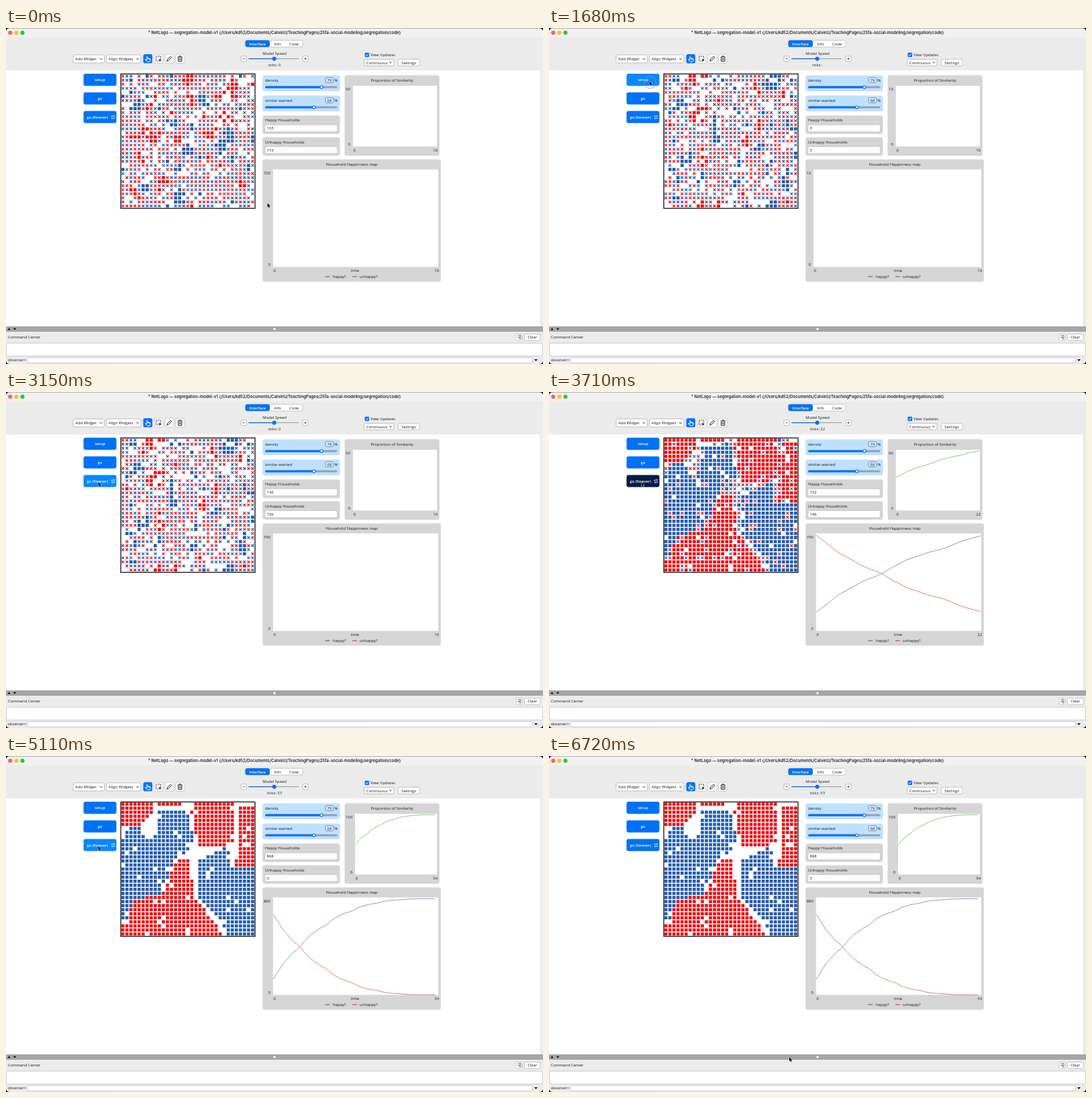
Animation of 800 by 500 pixels, one loop 6930 ms. Source, as an HTML page with a canvas:

```html
<!DOCTYPE html>
<html lang="en">
<head>
<meta charset="utf-8">
<title>Segregation model</title>
<style>
html, body { margin: 0; width: 100%; height: 100%; overflow: hidden; background: #000; }
canvas { display: block; width: 800px; height: 500px; }
</style>
</head>
<body>
<canvas id="stage" width="800" height="500"></canvas>
<script>
const ctx = document.getElementById('stage').getContext('2d');
const LOOP = 6930, STEP = 70;
const BLUE = '#0072f5', HOVER = '#0a87ff', DARK = '#051c45', PANEL = '#d5d5d5';
const AGENT = { red: '#eb1014', blue: '#235bab' };
const FAMILY = '"Open Sans", "Noto Sans", sans-serif';
const REGULAR = '5.85px ' + FAMILY, BOLD = '600 5.7px ' + FAMILY;
const N = 33, PITCH = 6.04, LEFT = 174.1, TOP = 71.6;

// ---------- drawing helpers ----------
function box(x, y, w, h, fill, r = 0, stroke, lw = 0.7) {
  ctx.beginPath();
  ctx.roundRect(x, y, w, h, r);
  if (fill) { ctx.fillStyle = fill; ctx.fill(); }
  if (stroke) { ctx.strokeStyle = stroke; ctx.lineWidth = lw; ctx.stroke(); }
}

function dot(x, y, r, fill, stroke, lw = 1) {
  box(x - r, y - r, 2 * r, 2 * r, fill, r, stroke, lw);
}

function shape(d, x, y, fill, stroke, lw = 0.8) {
  const p = new Path2D(d);
  ctx.save();
  ctx.translate(x, y);
  if (stroke) { ctx.strokeStyle = stroke; ctx.lineWidth = lw; ctx.stroke(p); }
  if (fill) { ctx.fillStyle = fill; ctx.fill(p); }
  ctx.restore();
}

// y is the middle of the capitals
function text(s, x, y, align = 'left', color = '#1c1c1c', font = REGULAR) {
  ctx.font = font;
  ctx.textAlign = align;
  ctx.fillStyle = color;
  ctx.fillText(s, x, y + 2.1);
}

function line(x0, y0, x1, y1, color, lw = 0.8) {
  shape(`M${x0} ${y0}L${x1} ${y1}`, 0, 0, null, color, lw);
}

function random(i, seed) {
  const v = Math.sin(i * 12.9898 + seed * 78.233) * 43758.5453;
  return v - Math.floor(v);
}

const clamp = v => Math.min(1, Math.max(0, v));
const roundUp = (v, unit) => Math.ceil(v / unit) * unit;

// ---------- model ----------
const DENSITY = 0.79, WANTED = 0.68, LAST = 53, HOUSEHOLDS = 868, CONTENT = 142;

const cellX = i => LEFT + (i % N) * PITCH;
const cellY = i => TOP + Math.floor(i / N) * PITCH;
const wrap = v => (v + N) % N;

function scatter(seed) {
  return Array.from({ length: N * N }, (_, i) =>
    random(i, seed) > DENSITY ? null : random(i, seed + 1) < 0.5 ? 'red' : 'blue');
}

function isContent(world, i) {
  let alike = 0, all = 0;
  for (let dy = -1; dy <= 1; dy++)
    for (let dx = -1; dx <= 1; dx++) {
      const other = world[wrap(Math.floor(i / N) + dy) * N + wrap(i % N + dx)];
      if (!other || (!dx && !dy)) continue;
      all++;
      if (other === world[i]) alike++;
    }
  return alike >= WANTED * all;
}

// outlines of the neighbourhoods that form in the end
const redLand = new Path2D(
  'M171 69H219V86L200 104H171Z M225 69H262V75H225Z' +
  'M280 69H342L337 92L340 122L332 134H288L274 86Z' +
  'M346 75H371V163H342L348 128Z' +
  'M256 153H272L281 208L324 268H171V250H180L190 214L232 206Z');
const blueLand = new Path2D(
  'M226 83L270 82L280 122L272 140L250 155L232 204L200 212L180 244H171V128L184 106H200L207 122L226 118Z' +
  'M283 158L324 136L336 140V164H371V268H328L322 244L286 212Z');

const before = scatter(3), start = scatter(11);
const settled = start.map((_, i) => {
  if (random(i, 21) < 0.03) return null;
  if (ctx.isPointInPath(redLand, cellX(i), cellY(i))) return 'red';
  return ctx.isPointInPath(blueLand, cellX(i), cellY(i)) ? 'blue' : null;
});

// share of the way from the random start to full contentment
function progress(tick) {
  const rest = 1 - tick / LAST;
  const bump = (0.025 + 0.02 * random(tick, 5)) * Math.abs(Math.sin(Math.PI * tick / 8.5));
  return 1 - Math.pow(rest, 2.83) + bump * Math.pow(rest, 1.5);
}
const happyAt = tick => Math.round(CONTENT + (HOUSEHOLDS - CONTENT) * progress(tick));
const unhappyAt = tick => HOUSEHOLDS - happyAt(tick);
const similarAt = tick => 49 + 49.4 * progress(tick);

// open ground clears last
function hasSettled(i, done) {
  const r = random(i, 22);
  return done >= (settled[i] ? 0.94 * r : 0.8 + 0.2 * r);
}

function stateAt(t) {
  if (t < 1610) return { world: before, tick: 0, happy: 153, unhappy: 719, done: 0 };
  if (t < 1750) return { world: start, tick: null, happy: 0, unhappy: 0, done: 0 };
  const tick = Math.round(LAST * (1 - Math.pow(1 - clamp((t - 3500) / 700), 1.5)));
  const done = progress(tick);
  const world = start.map((kind, i) => tick && hasSettled(i, done) ? settled[i] : kind);
  return { world, tick, happy: happyAt(tick), unhappy: unhappyAt(tick), done };
}

// ---------- pointer ----------
const moves = [
  { from: 70, to: 1400, a: [389.5, 260.5], b: [149.5, 79] },
  { from: 2100, to: 3150, a: [149.5, 79], b: [137.5, 134] },
  { from: 5110, to: 6720, a: [137.5, 134], b: [358, 448] }
];

function pointerAt(t) {
  const { from, to, a, b } = moves.findLast(m => t >= m.from) ?? moves[0];
  const u = clamp((t - from) / (to - from));
  const e = u * u * u * (10 - 15 * u + 6 * u * u);
  return { x: a[0] + (b[0] - a[0]) * e, y: a[1] + (b[1] - a[1]) * e };
}

// ---------- parts ----------
function drawWindow() {
  ctx.fillStyle = '#000';
  ctx.fillRect(0, 0, 800, 500);
  box(0, 0.6, 800, 499.4, '#ebebeb', 5);
  box(0, 0.6, 800, 13.4, '#f1f1f1', [5, 5, 0, 0]);
  ['#ff5f57', '#febc2e', '#28c840'].forEach((c, i) => dot(6.3 + 9.1 * i, 7, 3.1, c));
  text('* NetLogo — segregation-model-v1 {/Users/kd52/Documents/CalvinU/TeachingPages/25fa-social-modeling/segregation/code}',
    400, 7, 'center', '#222', '600 6.1px Inter, sans-serif');
  box(0, 63, 795.5, 381, '#fff');
}

function drawDropdown(label, x, y, w, h) {
  box(x, y, w, h, '#fff', 2, '#a8a8a8');
  text(label, x + 3.3, y + h / 2);
  shape('M-1.8 -1L0 1L1.8 -1', x + w - 5, y + h / 2, null, '#333', 0.9);
}

function drawTools() {
  drawDropdown('Add Widget', 100, 40, 46.5, 12);
  drawDropdown('Align Widgets', 149.5, 40, 51.5, 12);
  for (let i = 0; i < 4; i++)
    box(204.5 + 16 * i, 39, 13.5, 13.5, i ? '#f7f7f7' : BLUE, 2.5, i ? '#c4c4c4' : null);
  shape('M-1 1V-4.2M-1 -1.2H.8V1M.8 -.6H2.6V1M2.6 0H4V2.2Q4 4.5 2 4.5H.2Q-1 4.5 -3.5 .8L-1 1.6',
    211, 45.8, null, '#fff', 1);
  ctx.setLineDash([1.5, 1]);
  box(223.5, 42, 7, 7, null, 0, '#222', 0.9);
  ctx.setLineDash([]);
  shape('M0 0L4 1.5L2.2 2.2L1.5 4Z', 227.5, 46, '#222');
  shape('M-3.5 3.5L-2.8 1.2L2 -3.6L3.6 -2L-1.2 2.8Z', 243.2, 45.8, null, '#222', 1);
  shape('M-3.5 -2.6H3.5M-1.2 -2.8V-4H1.2V-2.8M-2.7 -2.4V4H2.7V-2.4M-.9 -1V2.5M.9 -1V2.5',
    259.2, 45.8, null, '#222', 0.9);
}

function drawToolbar(ticks) {
  box(356.5, 18.3, 85.5, 10, '#fff', 3, '#b4b4b4');
  box(356.5, 18.3, 36.5, 10, BLUE, 3);
  text('Interface', 374.7, 23.4, 'center', '#fff', BOLD);
  text('Info', 404.5, 23.4, 'center');
  text('Code', 429, 23.4, 'center');
  drawTools();

  text('Model Speed', 400, 37.6, 'center');
  for (const x of [350, 442]) {
    box(x, 41.8, 8, 8, '#fff', 1.5, '#a0a0a0');
    line(x + 2.3, 45.8, x + 5.7, 45.8, '#333');
  }
  line(446, 44.1, 446, 47.5, '#333');
  line(361.5, 45.7, 436, 45.7, '#a6a6a6', 1.2);
  line(361.5, 45.7, 400, 45.7, BLUE, 1.2);
  dot(399.6, 45.7, 3, BLUE);
  text('ticks: ' + (ticks ?? ''), 400, 54.6, 'center');

  box(534.5, 36.7, 6.6, 6.6, BLUE, 1.2);
  shape('M-1.8 0L-.5 1.5L2 -1.5', 537.8, 40, null, '#fff', 1);
  text('View Updates', 543, 40.2);
  drawDropdown('Continuous', 533.5, 46.5, 44.5, 9.8);
  box(584.5, 46.5, 31.5, 9.8, '#fff', 2, '#b0b0b0');
  text('Settings', 600.2, 51.4, 'center');
}

function drawButton(label, y, pointer, running, loops) {
  const over = pointer.x > 115.5 && pointer.x < 164.5 && pointer.y > y && pointer.y < y + 18;
  box(115.5, y, 49, 18, running ? DARK : over ? HOVER : BLUE, 3);
  text(label, loops ? 136.3 : 140, y + 9, 'center', '#fff', BOLD);
  if (loops) shape('M-2.3 -.3V-1.6H2M.9 -2.8L2.2 -1.6L.9 -.4M2.3 .4V1.8H-2M-.9 .6L-2.2 1.8L-.9 3',
    159.3, y + 9, null, '#fff', 0.8);
}

function drawView({ world, done }) {
  box(171, 68.4, 200, 200, '#fff', 0, '#111', 1.3);
  world.forEach((kind, i) => {
    if (!kind) return;
    const x = cellX(i), y = cellY(i);
    if ((done && hasSettled(i, done)) || isContent(world, i))
      box(x - 2.35, y - 2.35, 4.7, 4.7, AGENT[kind]);
    else
      shape('M-1.9 -1.9L1.9 1.9M1.9 -1.9L-1.9 1.9', x, y, null, AGENT[kind], 1.25);
  });
}

function drawSlider(label, value, y, knob) {
  box(382.3, y, 115.2, 23.5, '#bfe0ff', 3);
  text(label, 386, y + 7.5);
  box(476, y + 3.3, 11.8, 7.6, '#d9edff', 1.5, '#4a6f99');
  text(value, 481.9, y + 7.3, 'center');
  text('%', 489.3, y + 7.3);
  box(386, y + 15.9, 107.5, 3, '#93a0b0', 1.5);
  box(386, y + 15.9, knob - 386, 3, BLUE, 1.5);
  dot(knob, y + 17.4, 2.2, '#fff', BLUE, 1.1);
}

function drawMonitor(label, value, y) {
  box(382.3, y, 115.2, 27.5, PANEL, 3);
  text(label, 386, y + 7);
  box(385.8, y + 13.8, 107.6, 10.4, '#fff', 1.5, '#bdbdbd');
  text(value, 388.6, y + 19);
}

function drawPlot({ frame, title, area, series, xMax, yMax, ticks }) {
  const [fx, fy, fw, fh] = frame, [left, top, right, bottom] = area;
  box(fx, fy, fw, fh, PANEL, 3);
  text(title, fx + fw / 2, fy + 7.5, 'center');
  box(left, top, right - left, bottom - top, '#fff');
  text(yMax, left - 4, top + 5, 'right');
  text('0', left - 4, bottom - 3.3, 'right');
  text('0', left + 0.7, bottom + 5.7);
  text(xMax, right + 1, bottom + 5.7, 'right');
  if (!ticks) return;
  ctx.lineWidth = 0.75;
  ctx.lineJoin = 'round';
  for (const { color, at } of series) {
    ctx.beginPath();
    for (let t = 0; t <= ticks; t++)
      ctx.lineTo(left + 0.5 + (right - left - 1) * t / xMax, bottom - (bottom - top) * at(t) / yMax);
    ctx.strokeStyle = color;
    ctx.stroke();
  }
}

function drawPlots({ tick, happy, unhappy }) {
  const empty = tick === null, xMax = Math.max(10, roundUp(tick ?? 0, 2));
  const simMax = empty ? 10 : roundUp(similarAt(tick), 2);
  drawPlot({
    frame: [504.5, 70.3, 141.2, 120], title: 'Proportion of Similarity',
    area: [simMax > 99 ? 520 : 516.8, 86, 642, 176.3], xMax, yMax: simMax, ticks: tick,
    series: [{ color: '#5fb84c', at: similarAt }]
  });
  const peak = tick ? Math.max(unhappyAt(0), happy) : unhappy;
  drawPlot({
    frame: [382.3, 195.5, 265.5, 182], title: 'Household Happinness map',
    area: [empty ? 394 : 397.8, 210.5, 644, 355.4], xMax, yMax: empty ? 10 : roundUp(peak, 20), ticks: tick,
    series: [{ color: '#5b7fbe', at: happyAt }, { color: '#e0544f', at: unhappyAt }]
  });
  text('time', 520, 361, 'center');
  line(475.3, 370, 482.3, 370, '#345da9', 1);
  text('happy?', 487, 370);
  line(516, 370, 523, 370, '#d73229', 1);
  text('unhappy?', 527, 370);
}

function drawConsole() {
  box(0, 444, 800, 8, '#a6a6a6');
  dot(400, 448, 1.7, '#fff');
  shape('M-2.2 1.2H2.2L0 -1.4Z', 4.5, 448, '#000');
  shape('M-2.2 -1.2H2.2L0 1.4Z', 13, 448, '#000');
  text('Command Center', 3, 460.3);
  box(760, 455.5, 9.5, 9.5, '#fff', 1.8, '#b5b5b5');
  shape('M-2.2 -2.5H2.2V2.5H-.5M-2.5 .2H.6M-.5 -1L.7 .2L-.5 1.4', 764.8, 460.2, null, '#333', 0.7);
  box(772.5, 455.5, 23.5, 9.5, '#fff', 1.8, '#b5b5b5');
  text('Clear', 784.2, 460.3, 'center');
  box(0.5, 469, 799, 19, '#fff', 1, '#bababa');
  text('observer>', 2.5, 494.3);
  box(32, 490.5, 752.5, 7.8, '#fff', 1, '#bababa');
  shape('M-2.4 -1.3H2.4L0 1.5Z', 789.5, 494.3, '#000');
}

function drawPointer({ x, y }, clicking) {
  if (clicking) dot(x + 1, y + 2, 9, null, 'rgba(120,150,185,.9)', 0.9);
  shape('M0 0V6.2L1.5 4.9L2.5 7.2L3.6 6.7L2.6 4.5H4.5Z', x, y, '#000', '#fff', 0.9);
}

function draw(t) {
  const state = stateAt(t), pointer = pointerAt(t);
  const running = t >= 3500 && t < 4200;
  const clicking = (t >= 1540 && t < 1750) || (t >= 3500 && t < 3640);
  drawWindow();
  drawToolbar(state.tick);
  drawButton('setup', 68, pointer);
  drawButton('go', 95.8, pointer);
  drawButton('go (forever)', 123.6, pointer, running, true);
  drawView(state);
  drawSlider('density', 79, 70.5, 470);
  drawSlider('similar-wanted', 68, 100.5, 458.7);
  drawMonitor('Happy Households', state.happy, 130.3);
  drawMonitor('Unhappy Households', state.unhappy, 162.6);
  drawPlots(state);
  drawConsole();
  drawPointer(pointer, clicking);
}

const begin = performance.now();
let shown = -1;
function play() {
  const t = (performance.now() - begin) % LOOP;
  const now = Math.floor(t / STEP) * STEP;
  if (now !== shown) draw(shown = now);
  requestAnimationFrame(play);
}
play();
</script>
</body>
</html>
```
